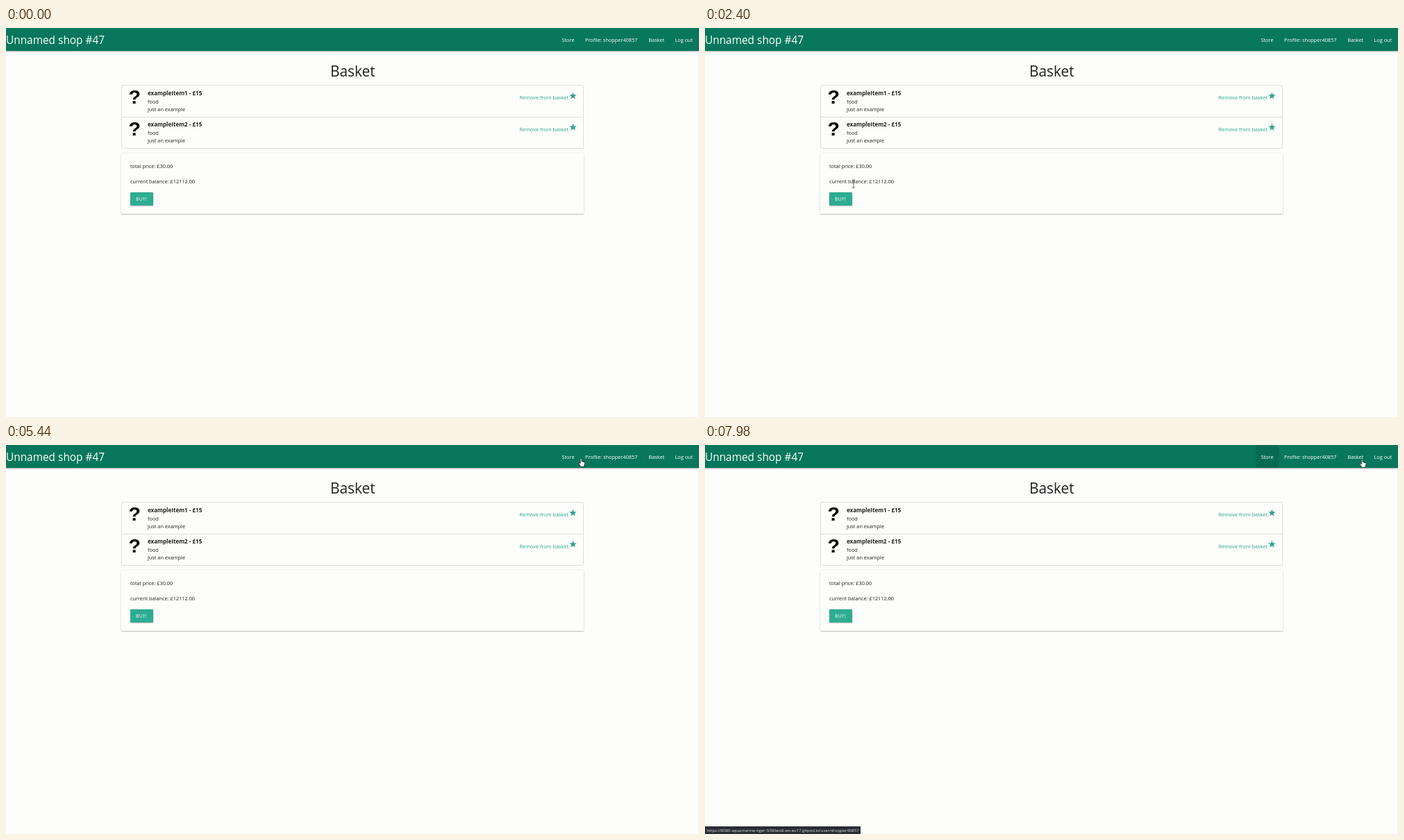
An HTML page for the animation above (8000 ms loop, 998x561 px).

```html
<!DOCTYPE html>
<html lang="en">
<head>
<meta charset="utf-8">
<title>Basket</title>
<style>
html, body { margin: 0; width: 100%; height: 100%; overflow: hidden; background: #fdfdfb; }
#stage { position: relative; width: 998px; height: 561px; overflow: hidden; background: #fdfdfb; }
#stage > * { position: absolute; box-sizing: border-box; }
.edge { right: 0; top: 34px; width: 1px; height: 527px; background: #f0f0f3; }
.nav { left: 0; top: 0; width: 998px; height: 33px; background: #08775b; }
.nav, .card, .buy { box-shadow: 0 1px 1px rgba(0,0,0,.14), 0 .5px 2.5px rgba(0,0,0,.2); }
.hover { top: 0; height: 33px; background: #000; opacity: 0; }
.list { left: 166px; top: 82px; width: 666px; height: 92px; border: 1px solid #dedede; border-radius: 2px; }
.rule { left: 167px; top: 128px; width: 664px; height: 1px; background: #dedede; }
.card { left: 166px; top: 181px; width: 666px; height: 87px; border-radius: 1px; background: #fdfdfb; }
.buy { left: 179px; top: 237px; width: 33px; height: 19px; border-radius: 1px; background: #2eac91; }
svg { left: 0; top: 0; }
text { font: 7.35px "Open Sans", "Noto Sans", sans-serif; fill: #212121; white-space: pre; }
.light { fill: #fff; }
.brand { font-size: 15.4px; }
.title { font-size: 20.9px; text-anchor: middle; }
.name { font-size: 8.05px; font-weight: 700; }
.mark { font: 700 28.5px "Liberation Sans", Arial, sans-serif; fill: #000; text-anchor: middle; }
.link { fill: #2ba38b; }
.label { font-size: 6.8px; letter-spacing: .26px; }
.status text { font-size: 5.97px; fill: #dcdde0; }
.status rect { fill: #2a2d33; }
.status, .pointer { opacity: 0; }
.pointer { fill: #fff; stroke: #111; stroke-width: .75; stroke-linejoin: round; }
#beam { fill: none; stroke: #333; }
</style>
</head>
<body>
<div id="stage">
  <div class="edge"></div>
  <div class="nav"></div>
  <div class="hover" id="storeHover" style="left:793px;width:34px"></div>
  <div class="hover" id="profileHover" style="left:827px;width:91px"></div>
  <div class="list"></div>
  <div class="rule"></div>
  <div class="card"></div>
  <div class="buy" id="buy"></div>
  <svg width="998" height="561" viewBox="0 0 998 561">
    <g id="copy"></g>
    <g class="status" id="storeStatus"></g>
    <g class="status" id="userStatus"></g>
    <g id="cursor">
      <path class="pointer" id="arrow" d="M.4 .4V9.4L2.5 7.5 3.8 10.5 5.2 9.9 3.9 7H6.6Z"/>
      <path class="pointer" id="beam" d="M-2-5.5H2M0-5.5V5.5M-2 5.5H2"/>
      <path class="pointer" id="hand" d="M-1 .8Q0-.6 1 .8V4.6L5 5.8Q5.6 6.2 5.5 7.2L4.2 12.3H-.6L-3.4 7.6Q-3.6 6.4-2.3 6.6L-1 7.8Z"/>
    </g>
  </svg>
</div>
<script>
const LOOP = 8000, FADE = 300;
const byId = id => document.getElementById(id);

function add(parent, tag, attrs, content = "") {
  const node = document.createElementNS("http://www.w3.org/2000/svg", tag);
  for (const key in attrs) node.setAttribute(key, attrs[key]);
  node.textContent = content;
  parent.append(node);
}
const copy = byId("copy");
const write = (x, y, content, kind = "") => add(copy, "text", { x, y, class: kind }, content);

const user = "shopper40857";
write(0, 23, "Unnamed shop #47", "light brand");
write(800.5, 19.5, "Store", "light");
write(834, 19.5, "Profile: " + user, "light");
write(925.5, 19.5, "Basket", "light");
write(963.5, 19.5, "Log out", "light");
write(499.3, 70, "Basket", "title");

function star(cx, cy) {
  const points = Array.from({ length: 10 }, (_, i) => {
    const r = i % 2 ? 2.2 : 5.6, a = i * Math.PI / 5;
    return [cx + r * Math.sin(a), cy - r * Math.cos(a)];
  });
  add(copy, "polygon", { points: points.join(" "), class: "link" });
}
[1, 2].forEach((n, i) => {
  const y = i * 45.2;
  write(185.3, 109.3 + y, "?", "mark");
  write(204, 97.2 + y, `exampleItem${n} - £15`, "name");
  write(204, 108.5 + y, "food");
  write(204, 120 + y, "just an example");
  write(739.5, 103.3 + y, "Remove from basket", "link");
  star(816.5, 98 + y);
});
write(179, 202.3, "total price: £30.00");
write(179, 224, "current balance: £12112.00");
write(187, 249.2, "BUY!", "light label");

function status(id, path, width) {
  add(byId(id), "rect", { x: 0, y: 550, width, height: 11 });
  add(byId(id), "text", { x: 2.5, y: 557.8 }, "https://8080-aquamarine-tiger-5i56lwo8.ws-eu17.gitpod.io/" + path);
}
status("storeStatus", "store", 184);
status("userStatus", "user/" + user, 224);

const run = (id, frames) => byId(id).animate(frames, { duration: LOOP, iterations: Infinity });
const at = (t, props) => ({ offset: Math.min(t / LOOP, 1), ...props });

// Shown only between start and end; several spans share one node by stacking.
const show = (id, ...spans) => run(id, [
  at(0, { opacity: 0, easing: "step-end" }),
  ...spans.flatMap(([start, end]) => [
    at(start, { opacity: 1, easing: "step-end" }),
    at(end, { opacity: 0, easing: "step-end" })
  ]),
  at(LOOP, { opacity: 0 })
]);

// Fades in when the pointer enters and out again when it leaves.
function hover(id, prop, off, on, enter, leave) {
  const off$ = { [prop]: off }, on$ = { [prop]: on };
  run(id, [
    at(0, off$), at(enter, off$), at(enter + FADE, on$),
    at(Math.min(leave, LOOP), on$), at(leave + FADE, leave < LOOP ? off$ : on$),
    at(LOOP, leave < LOOP ? off$ : on$)
  ]);
}

// Key stops of the pointer: time, x, y.
const stops = [
  [0, 15.5, 323], [840, 15.5, 323], [1120, 150, 358], [1600, 438, 241], [2000, 350, 190],
  [2400, 214, 224.7], [2500, 214, 224.7], [2900, 198, 248.5], [3700, 198, 248.5],
  [4100, 511, 147], [4500, 790, 121], [5020, 815, 120], [5400, 828, 19],
  [6400, 830, 19], [6560, 820, 19], [7820, 821, 19], [7980, 946.5, 20], [LOOP, 946.5, 20]
];
run("cursor", stops.map(([t, x, y]) => at(t, { transform: `translate(${x}px, ${y}px)` })));

show("arrow", [840, 2260], [2600, 2800], [3740, 5340]);
show("beam", [2260, 2600]);
show("hand", [2800, 3740], [5340, LOOP]);
show("userStatus", [5640, 6500], [7880, LOOP]);
show("storeStatus", [6500, 7880]);

hover("buy", "backgroundColor", "#2eac91", "#37c2a3", 2800, 3760);
hover("profileHover", "opacity", 0, .1, 5400, 6520);
hover("storeHover", "opacity", 0, .1, 6560, LOOP);
</script>
</body>
</html>
```
